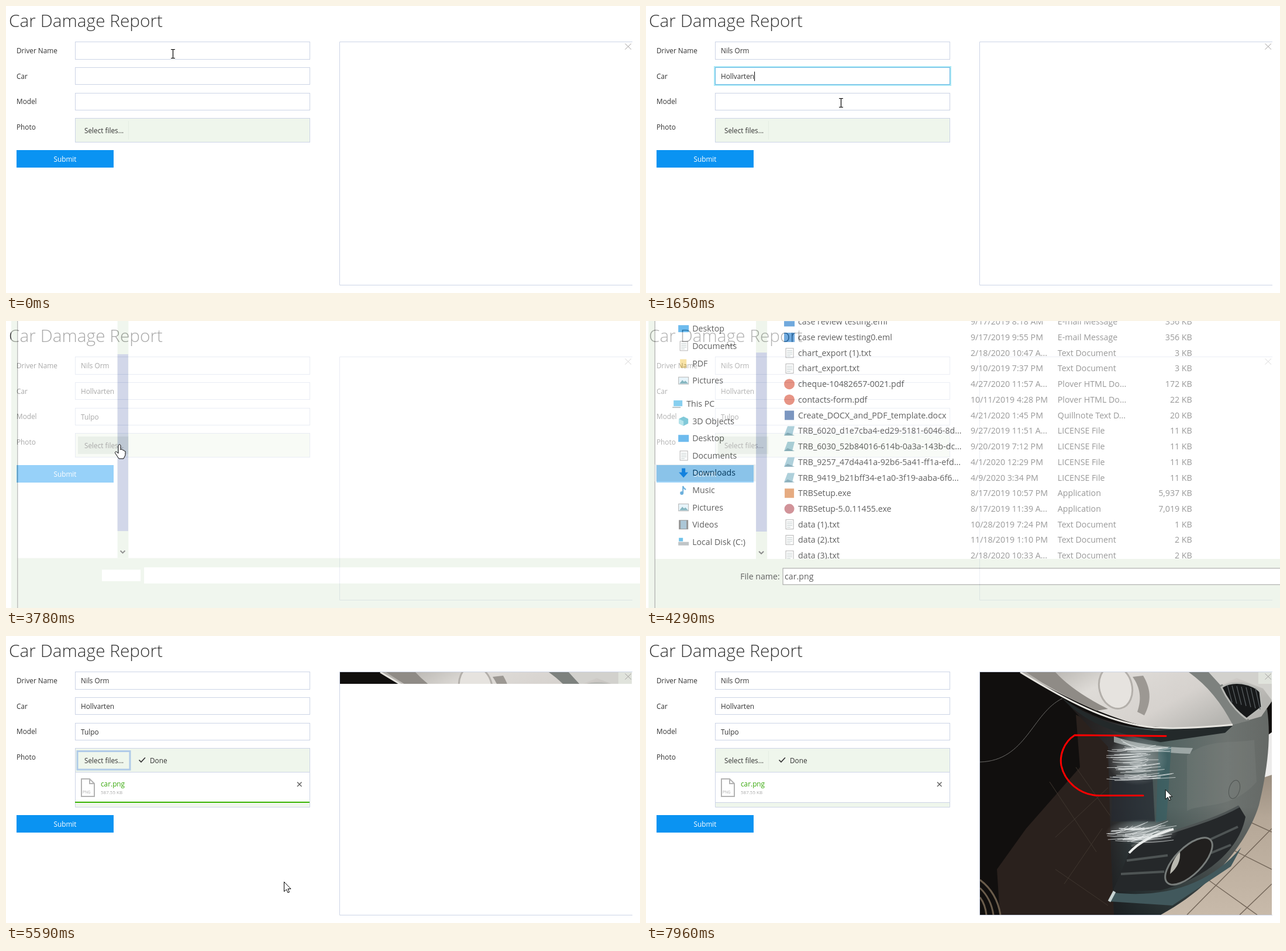
An HTML page that plays this animation: 1084x492 px, repeating every 7990 ms.

```html
<!DOCTYPE html>
<html lang="en">
<head>
<meta charset="utf-8">
<title>Car Damage Report</title>
<style>
  html, body { margin: 0; width: 100%; height: 100%; overflow: hidden; background: #fff; }
  svg { display: block; font: 11.8px "Open Sans", "Noto Sans", sans-serif; fill: #333; }
  .title { font-size: 29.8px; font-weight: 300; }
  .line { fill: none; stroke: #ccd4e6; }
  .box { fill: #fff; stroke: #ccd4e6; }
  .pale { fill: #eff6ec; }
  .glow { fill: none; stroke: #aeeaf6; stroke-width: 5; }
  .ring { fill: none; stroke: #62b4e2; }
  .cursor { fill: #fff; stroke: #000; }
  #dialog { font-size: 14.2px; fill: #000; }
  #dialog .dim { fill: #5c5c5c; }
  #dialog .end { text-anchor: end; }
</style>
</head>
<body>
<svg width="1084" height="492" viewBox="0 0 1084 492">
  <defs>
    <linearGradient id="body" x1="0" x2="1">
      <stop offset="0" stop-color="#1d1918"/><stop offset=".24" stop-color="#2c2b2c"/>
      <stop offset=".36" stop-color="#3b4749"/><stop offset=".52" stop-color="#546462"/>
      <stop offset=".8" stop-color="#6d7370"/><stop offset="1" stop-color="#656966"/>
    </linearGradient>
    <linearGradient id="low" x2="0" y2="1">
      <stop offset=".5" stop-color="#14191b" stop-opacity="0"/><stop offset="1" stop-color="#14191b" stop-opacity=".7"/>
    </linearGradient>
    <linearGradient id="lamp" x2="1" y2=".4">
      <stop offset="0" stop-color="#aaa7a2"/><stop offset=".35" stop-color="#dedbd7"/>
      <stop offset=".7" stop-color="#d6d2ce"/><stop offset="1" stop-color="#b5b4b0"/>
    </linearGradient>
    <linearGradient id="floor" x2="0" y2="1">
      <stop offset="0" stop-color="#8c8073"/><stop offset=".4" stop-color="#b5a797"/>
      <stop offset="1" stop-color="#c8baaa"/>
    </linearGradient>
    <radialGradient id="scuff">
      <stop offset="0" stop-color="#dfe4e4" stop-opacity=".6"/><stop offset="1" stop-color="#dfe4e4" stop-opacity="0"/>
    </radialGradient>
    <clipPath id="frame"><rect id="reveal" x="571" y="62" width="499" height="416"/></clipPath>
    <clipPath id="list"><rect x="0" y="0" width="1084" height="408"/></clipPath>
  </defs>

  <text class="title" x="5" y="36">Car Damage Report</text>
  <g id="labels"></g>
  <g id="fields"></g>

  <rect class="pale" x="118.5" y="192.5" width="401" height="41" stroke="#ccd4e6"/>
  <rect id="hover" x="123" y="198" width="87" height="30" fill="#cfdccb"/>
  <path id="edge" d="M209.5 197V229" stroke="#e4ede4"/>
  <rect id="pressed" x="122" y="197.500" width="90" height="31.500" fill="#eff6ec" stroke="#b0cbe8" stroke-width="3"/>
  <text x="134" y="218">Select files...</text>

  <g id="upload">
    <path class="box" d="M118.500 233.500H519.500V293.500H118.500Z"/>
    <path class="pale" d="M119 286H519V293H119Z"/>
    <path class="line" d="M119 285.500H519"/>
    <rect id="bar" x="118" y="284" height="2" fill="#37b400"/>
    <path d="M129 245H143L151 253V275H129Z M143 245V253H151" fill="none" stroke="#b3b3b3" stroke-width="2"/>
    <text x="131" y="270" font-size="6.500" style="fill:#aaa">PNG</text>
    <text id="file" x="162" y="258">car.png</text>
    <text x="162" y="271" font-size="8" style="fill:#aaa">587.55 KB</text>
    <path d="M498 250.500L505.500 258M505.500 250.500L498 258" stroke="#666" stroke-width="1.500"/>
    <g id="done">
      <path d="M227.500 212.500L231 216L238 208.500" fill="none" stroke="#333" stroke-width="1.700"/>
      <text x="246" y="218">Done</text>
    </g>
  </g>

  <g id="submit">
    <rect x="18" y="247" width="166" height="30" fill="#0a93f2"/>
    <text x="101" y="267" text-anchor="middle" style="fill:#fff">Submit</text>
  </g>

  <path class="line" d="M1071 61.500H570.500V478.500H1071"/>
  <g id="photo" clip-path="url(#frame)">
    <rect x="571" y="62" width="499" height="416" fill="#110f0e"/>
    <path d="M735 135L800 165V478H605L600 400 650 330 742 225Z" fill="#2a211d"/>
    <path d="M690 250L770 370M735 225L795 310M790 260L700 345M780 330L715 425M700 400L790 462" stroke="#3f362f"/>
    <!-- floor -->
    <path d="M860 478L1000 360 1048 270 1062 225 1070 200V478Z" fill="url(#floor)"/>
    <path d="M1000 365L1070 400M950 410L1045 478M1035 320L1070 336M1070 330L925 478M1070 425L1015 478"
      stroke="#75685b" stroke-width="1.500"/>
    <path d="M1056 175L1070 165V238L1058 242Z" fill="#ecebea"/>
    <!-- bumper -->
    <path id="shell" d="M712 107C760 140 820 160 880 160L1003 152 1062 125C1070 180 1060 240 1048 290 1030 350 970 430 880 478H800L795 370 790 190Z" fill="url(#body)"/>
    <path d="M712 107C760 140 820 160 880 160L1003 152 1062 125C1070 180 1060 240 1048 290 1030 350 970 430 880 478H800L795 370 790 190Z" fill="url(#low)"/>
    <path d="M712 107C760 140 800 158 870 162L1003 154 990 166 880 182C800 168 750 148 712 107Z" fill="#23292a"/>
    <path d="M800 172Q850 190 935 192L930 202Q860 200 800 182Z" fill="#b9c2c0" opacity=".7"/>
    <path d="M796 240H866L870 318H796Z" fill="#262a31" opacity=".7"/>
    <path d="M876 195L898 190 890 315 872 320Z" fill="#386064" opacity=".7"/>
    <path d="M925 205C960 175 1005 185 1040 178L1044 250C1000 300 950 285 925 300Z" fill="#8b918d" opacity=".2"/>
    <ellipse cx="1006" cy="263" rx="9" ry="16" fill="none" stroke="#505553" transform="rotate(15 1006 263)"/>
    <!-- headlight -->
    <path d="M640 62H1070V112L1052 138 1003 152C950 158 890 158 850 154 790 140 715 105 640 62Z" fill="url(#lamp)"/>
    <path d="M650 62H700Q730 95 790 125L770 128Q705 100 650 62Z" fill="#8f8b86"/>
    <ellipse cx="803" cy="88" rx="28" ry="37" fill="#e6e3df" stroke="#b3afaa" stroke-width="3" transform="rotate(-14 803 88)"/>
    <path d="M832 70C845 88 848 108 840 130L852 136C866 110 862 88 850 68Z" fill="#9c9893"/>
    <path d="M928 62C960 85 984 115 1003 152L1032 145 970 62Z" fill="#7d817e"/>
    <path d="M962 62H1070V110L1055 90 1010 72 982 84Z" fill="#d2d1cd"/>
    <path d="M984 88C1005 74 1040 82 1050 96L1053 122 1027 142C1010 130 995 112 984 88Z" fill="#17191a" stroke="#b7b8b4" stroke-width="3"/>
    <path id="grille" stroke="#5a6063" stroke-width="1.200"/>
    <path d="M640 62C715 108 790 150 870 157 920 159 960 156 1003 152" fill="none" stroke="#e6e4df" stroke-width="3"/>
    <path d="M571 216C650 214 660 132 712 107" fill="none" stroke="#6c6b68"/>
    <path d="M571 418Q600 440 606 478M571 432Q590 450 594 478M571 448Q580 460 582 478" fill="none" stroke="#6a5c4b" stroke-width="3"/>
    <!-- lower grille and fog lamp -->
    <path d="M798 438L832 358C880 338 960 322 1014 292L1025 310C1015 365 960 415 880 436Z" fill="#25282a"/>
    <path d="M830 360C890 336 960 322 1014 292M822 385L892 376M812 408L886 404M962 350L1012 327M966 372L1000 358" fill="none" stroke="#4e5454" stroke-width="4"/>
    <path d="M826 372Q850 345 902 331" fill="none" stroke="#eceeec" stroke-width="4"/>
    <ellipse cx="928" cy="386" rx="52" ry="23" fill="#211f1e" stroke="#777c7a" stroke-width="3" transform="rotate(-45 928 386)"/>
    <path d="M896 408Q898 385 913 370Q915 392 896 408Z" fill="#bab9b1"/>
    <path d="M792 455L800 440C890 450 965 425 1018 362L1000 395 900 462Z" fill="#41585c"/>
    <path d="M792 455L801 438" stroke="#c9d4d3" stroke-width="5"/>
    <ellipse cx="840" cy="212" rx="52" ry="44" fill="url(#scuff)"/>
    <ellipse cx="848" cy="336" rx="62" ry="22" fill="url(#scuff)"/>
    <path id="scratches" fill="none" stroke="#e9ecec" opacity=".75"/>
  </g>
  <rect id="corner" x="1047" y="62" width="23" height="20" class="pale" opacity=".5"/>
  <path d="M1058.500 64.500L1069 74.500M1069 64.500L1058.500 74.500" stroke="#a3a0a0"/>
  <path id="ink" d="M889 171.500L733 170C714 182 707 205 710 222 716 250 742 273 775 273.500L850 273.500"
    fill="none" stroke="#f00" stroke-width="3" stroke-linecap="round"/>

  <g id="dialog"></g>

  <path id="beam" class="cursor" d="M-3.500-7.500H3.500M-3.500 7.500H3.500M0-7.500V7.500" stroke-width="1.200"/>
  <path id="hand" class="cursor" d="M-1 2C-1-1 3-1 3 2V9C4 7 7 8 7 10 8 9 10 10 10 11.500 12 11 11 12 11 14V18L8 24H0L-6 15C-8 12-4 11-3 13L-1 15Z"/>
  <path id="arrow" class="cursor" d="M0 0V16.500L4 13 6.500 18.500 9 17.500 6.500 12H11.500Z"/>
</svg>

<script>
const LOOP = 7990;
const $ = id => document.getElementById(id);
const ramp = (t, a, b) => Math.max(0, Math.min(1, (t - a) / (b - a)));
const mix = (a, b, k) => a + (b - a) * k;
const show = (id, on) => $(id).setAttribute('visibility', on ? 'visible' : 'hidden');
const fade = (id, k) => $(id).setAttribute('opacity', k);
const text = (x, y, s, cls = '') => `<text x="${x}" y="${y}" class="${cls}">${s}</text>`;
const rect = (x, y, w, h, fill, extra = '') =>
  `<rect x="${x}" y="${y}" width="${w}" height="${h}" fill="${fill}" ${extra}/>`;

// Form
$('labels').innerHTML = ['Driver Name', 'Car', 'Model', 'Photo']
  .map((s, i) => text(18, 81 + i * 43.7, s)).join('');

const fields = [
  { y: 61.5, h: 30, value: 'Nils Orm', typed: 1140, on: [430, 550], off: [1140, 1340] },
  { y: 105.5, h: 29, value: 'Hollvarten', typed: 1650, on: [1140, 1350], off: [1650, 1950] },
  { y: 149.5, h: 29, value: 'Tulpo', typed: 2750, on: [1650, 1960], off: [3250, 3430] }
];
$('fields').innerHTML = fields.map((f, i) => {
  const size = `x="118.5" y="${f.y}" width="401" height="${f.h}"`;
  return `<rect class="box" ${size}/><g id="focus${i}"><rect class="glow" ${size}/>
    <rect class="box" ${size}/><rect class="ring" ${size}/></g>
    <text id="value${i}" x="128" y="${f.y + 19.5}">${f.value}</text>
    <rect id="caret${i}" y="${f.y + 7}" width="1" height="16" fill="#000"/>`;
}).join('');

// Photo details
let seed = 7;
const rnd = () => (seed = seed * 16807 % 2147483647) / 2147483647;
const scratch = (y, h, n, rise) => Array.from({ length: n }, () => {
  const x = 787 + rnd() * 45, w = 25 + rnd() * 55, top = y + rnd() * h;
  return `M${x} ${top}q${w / 2} ${4 - rnd() * 5} ${w} ${-rnd() * rise}`;
}).join('');
$('scratches').setAttribute('d', scratch(192, 56, 44, 7) + scratch(328, 26, 36, 16) +
  'M812 178l22 14M815 182l34 12M818 190l50 6');
$('grille').setAttribute('d', Array.from({ length: 7 }, (_, i) => `M${994 + i * 8} ${84 + i}l8 ${30 + i}`).join(''));

// File dialog
const icons = {
  blue: () => rect(0, 1, 18, 16, '#1976c9'),
  word: () => rect(1, 1, 16, 16, '#2b579a'),
  web: () => '<circle cx="9" cy="9" r="9" fill="#d9533b"/>',
  page: () => rect(3, 1, 13, 16, '#fff', 'stroke="#888"') + '<path d="M5 5h9M5 8h9M5 11h9M5 14h6" stroke="#9aa"/>',
  seal: () => '<path d="M6 1H18L14 17H0Z" fill="#7db4c6"/><path d="M0 17L6 12 18 17Z" fill="#467f94"/>',
  app: () => rect(1, 1, 16, 16, '#d87935'),
  ball: () => '<circle cx="9" cy="9" r="8.500" fill="#b5525c"/>',
  desk: () => rect(0, 3, 18, 12, '#1692e5'),
  folder: () => rect(3, 2, 11, 15, '#f5d271'),
  image: () => rect(0.5, 3, 17, 12, '#d9eef8', 'stroke="#888"') + '<path d="M2 14L7 8 10 11 12 9 17 14Z" fill="#3d8a9b"/>',
  pc: () => rect(2, 3, 15, 10, '#3fb3e8') + rect(0, 14, 14, 2, '#8fa0a8'),
  cube: () => '<path d="M9 1L17 5V13L9 17 1 13V5Z" fill="#35a9c2"/><path d="M9 9V17L1 13V5Z" fill="#8ad4e0"/>',
  down: () => '<path d="M6 1H12V8H17L9 17 1 8H6Z" fill="#1877d2"/>',
  note: () => '<path d="M8 14V2Q9 6 13 8" fill="none" stroke="#1580c8" stroke-width="2"/><circle cx="6" cy="14" r="3" fill="#1580c8"/>',
  film: () => rect(1, 1, 16, 16, '#555') + rect(4, 2, 10, 14, '#7aa5c0'),
  disk: () => rect(0, 9, 18, 6, '#9aa2a6') + rect(1, 2, 7, 6, '#19a0e0')
};
const icon = (kind, x, y) => `<g transform="translate(${x} ${y - 9})">${icons[kind]()}</g>`;

const nav = [
  ['Desktop', 'desk'], ['Documents', 'page'], ['PDF', 'folder'], ['Pictures', 'image'],
  ['This PC', 'pc'], ['3D Objects', 'cube'], ['Desktop', 'desk'], ['Documents', 'page'],
  ['Downloads', 'down'], ['Music', 'note'], ['Pictures', 'image'], ['Videos', 'film'], ['Local Disk (C:)', 'disk']
];
const types = {
  blue: 'E-mail Message', page: 'Text Document', web: 'Plover HTML Do...', word: 'Quillnote Text D...',
  seal: 'LICENSE File', app: 'Application', ball: 'Application'
};
const files = `case review testing.eml|9/17/2019 8:18 AM|blue|356
case review testing0.eml|9/17/2019 9:55 PM|blue|356
chart_export (1).txt|2/18/2020 10:47 A...|page|3
chart_export.txt|9/10/2019 7:37 PM|page|3
cheque-10482657-0021.pdf|4/27/2020 11:57 A...|web|172
contacts-form.pdf|10/11/2019 4:28 PM|web|22
Create_DOCX_and_PDF_template.docx|4/21/2020 1:45 PM|word|20
TRB_6020_d1e7cba4-ed29-5181-6046-8d...|9/27/2019 11:51 A...|seal|11
TRB_6030_52b84016-614b-0a3a-143b-dc...|9/20/2019 7:12 PM|seal|11
TRB_9257_47d4a41a-92b6-5a41-ff1a-efd...|4/1/2020 12:29 PM|seal|11
TRB_9419_b21bff34-e1a0-3f19-aaba-6f6...|4/9/2020 3:34 PM|seal|11
TRBSetup.exe|8/17/2019 10:57 PM|app|5,937
TRBSetup-5.0.11455.exe|8/17/2019 11:39 A...|ball|7,019
data (1).txt|10/28/2019 7:24 PM|page|1
data (2).txt|11/18/2019 1:10 PM|page|2
data (3).txt|2/18/2020 10:33 A...|page|2`.split('\n').map(s => s.split('|'));

const navRows = nav.map(([s, kind], i) => {
  const y = i < 4 ? 13 + i * 29.7 : 142 + (i - 4) * 29.6, x = i === 4 ? 69 : 79;
  return icon(kind, x - 24, y) + text(x, y + 5, s);
}).join('');
const fileRows = files.map(([name, date, kind, size], i) => {
  const y = 1.2 + i * 26.73;
  return icon(kind, 236, y) + text(260, y + 5, name) + text(555, y + 5, date, 'dim') +
    text(704, y + 5, types[kind], 'dim') + text(934, y + 5, size + ' KB', 'dim end');
}).join('');
$('dialog').innerHTML =
  rect(4, -60, 1300, 620, '#e6f0e2') + rect(15, -60, 1300, 468, '#fff') +
  rect(188, -60, 19, 468, '#e6f0e2') + rect(188, 54, 18.5, 307, '#b2bbd9') +
  '<path d="M193 395l4 4 4-4" fill="none" stroke="#444" stroke-width="2"/>' +
  '<path d="M15 -60V560" stroke="#666"/>' + rect(234, 424, 1000, 28, '#fff') +
  `<g id="blank">${rect(161, 428, 67, 20, '#fff')}</g>
   <g id="content"><g clip-path="url(#list)">${rect(15, 246, 172, 29, '#d9e1e4')}${navRows}${fileRows}</g>
   ${text(161, 443, 'File name:')}${rect(234, 424, 1000, 28, 'none', 'stroke="#666"')}</g>
   <g id="chosen">${text(237, 443, 'car.png')}</g>`;

// Mouse
const ink = $('ink'), inkLength = ink.getTotalLength(), TURN = 212;
const drawn = t => t < 7690 ? TURN * ramp(t, 6910, 7690) : mix(TURN, inkLength + 39, ramp(t, 7690, 7960));

function mouse(t) {
  if (t < 1140) return ['beam', 285.5, t < 30 ? 82 : t < 130 ? 81 : 80];
  if (t < 1650) return ['beam', 315.5, 122];
  if (t < 3840) {
    const k = ramp(t, 2750, 3250), x = mix(333.5, 193, k), y = mix(166, 212, k);
    return [y < 179 ? 'beam' : x < 211 ? 'hand' : 'arrow', x, y];
  }
  if (t < 4470) return ['', 0, 0];
  if (t < 6090) {
    const k = ramp(t, 4470, 5010);
    return ['arrow', mix(560, 475.5, k), mix(500, 421.5, k)];
  }
  if (t < 6910) {
    const k = ramp(t, 6090, 6790), j = ramp(t, 6790, 6900);
    return ['arrow', mix(475.5, 829.5, k) + 59.5 * j, mix(421.5, 203.5, k) - 32 * j];
  }
  const s = drawn(t), p = ink.getPointAtLength(Math.min(s, inkLength)), over = Math.max(0, s - inkLength);
  return ['arrow', p.x + over * 0.98, p.y - over * 0.26];
}

function draw(t) {
  fields.forEach((f, i) => {
    const typed = t >= f.typed;
    fade('focus' + i, ramp(t, ...f.on) - ramp(t, ...f.off));
    show('value' + i, typed);
    const blink = [t < 910, true, t < 2120 || t >= 2750][i];
    show('caret' + i, t >= f.on[0] + 30 && t < f.off[0] + 30 && blink);
    $('caret' + i).setAttribute('x', 128 + (typed ? $('value' + i).getComputedTextLength() : 0));
  });

  const listed = t >= 4470, focused = listed && t < 6910;
  show('hover', t >= 3190 && !listed);
  show('edge', !focused);
  show('pressed', focused);
  show('upload', listed);
  fade('done', ramp(t, 5010, 5160));
  $('file').style.fill = t < 5040 ? '#333' : '#37a80a';
  $('bar').setAttribute('width', 401 * ramp(t, 4560, 5190));
  fade('bar', 1 - ramp(t, 6090, 7900));
  $('submit').setAttribute('transform', `translate(0 ${listed ? 60 : 0})`);

  show('photo', t >= 5590);
  show('corner', t >= 5590);
  $('reveal').setAttribute('height', t < 6090 ? 20 : 416);
  show('ink', t >= 6910);
  ink.setAttribute('stroke-dasharray', `${Math.max(0.1, drawn(t - 50))} 999`);

  const open = ramp(t, 3660, 3870), close = ramp(t, 4200, 4440);
  const scale = 1.004 - 0.092 * (1 - open) ** 2 - 0.012 * close;
  fade('dialog', Math.min(open, 1 - close));
  $('dialog').setAttribute('transform', `translate(400 290) scale(${scale}) translate(-400 -290)`);
  $('dialog').style.display = t >= 3690 && t < 4440 ? '' : 'none';
  show('content', t >= 3840);
  show('blank', t < 3840);
  show('chosen', t >= 4230);

  const [kind, x, y] = mouse(t);
  for (const id of ['beam', 'hand', 'arrow']) show(id, id === kind);
  if (kind) $(kind).setAttribute('transform', `translate(${x} ${y})`);
}

const start = performance.now();
(function tick() {
  draw((performance.now() - start) % LOOP);
  requestAnimationFrame(tick);
})();
</script>
</body>
</html>
```
